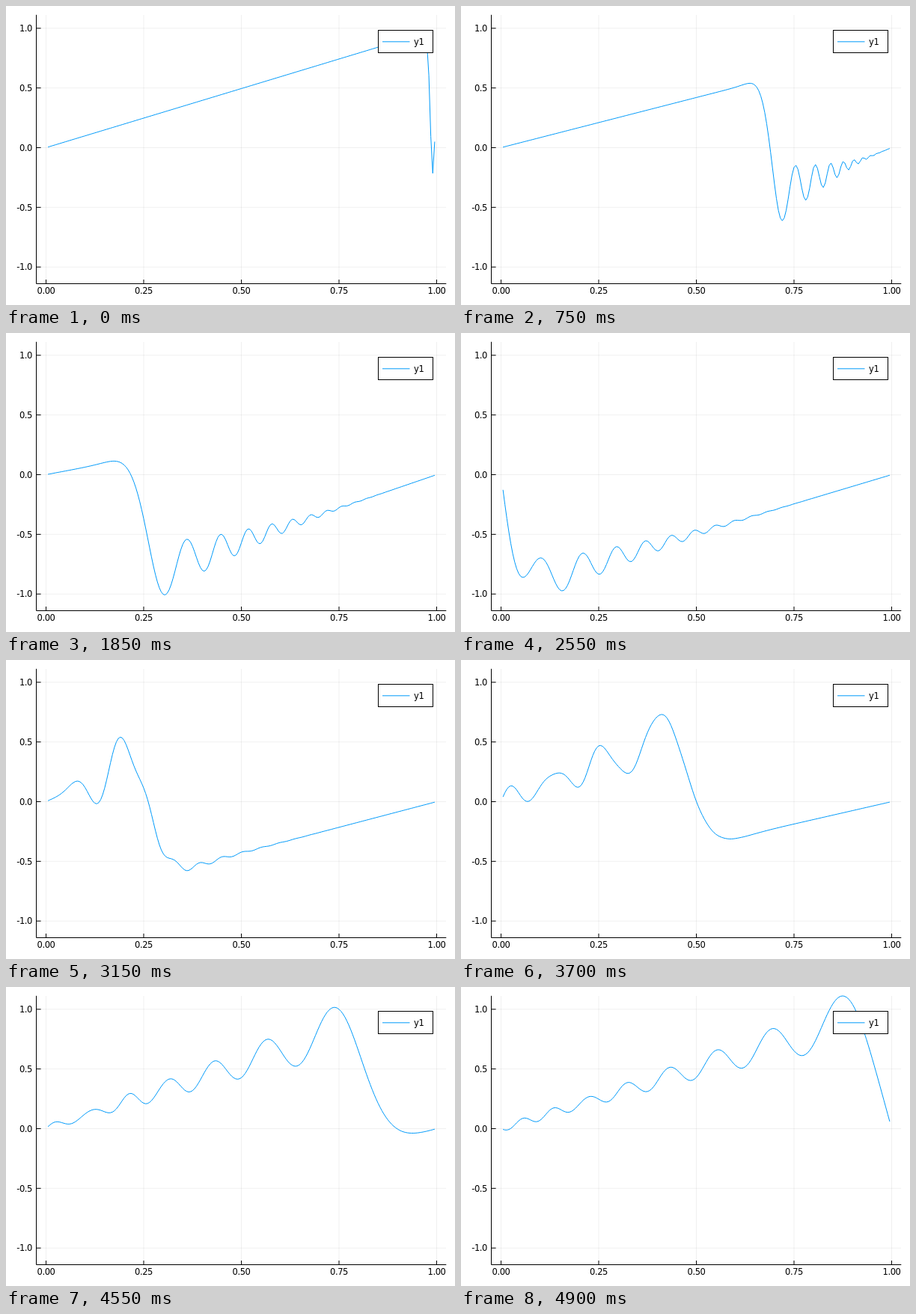
An HTML page for the animation above (4950 ms loop, 600 by 400 pixels).

```html
<!DOCTYPE html>
<html lang="en">
<head>
<meta charset="utf-8">
<title>Plucked string</title>
<style>
  html, body { margin: 0; width: 100%; height: 100%; overflow: hidden; background: #fff; }
  svg { display: block; width: 600px; height: 400px; }
  text { font: 11.5px "DejaVu Sans", sans-serif; letter-spacing: -.4px; fill: #000; }
  .grid { stroke: #000; stroke-opacity: .1; stroke-width: .6; }
  .axis { stroke: #000; stroke-width: 1; fill: none; }
  .wave { stroke: #009afa; stroke-width: 1; fill: none; stroke-linejoin: round; }
</style>
</head>
<body>
<svg viewBox="0 0 600 400">
  <g id="grid" class="grid"></g>
  <path id="axes" class="axis"></path>
  <g id="labels"></g>
  <path id="wave" class="wave"></path>
  <rect x="497.5" y="32.5" width="73" height="30" fill="#fff" stroke="#000"/>
  <path class="wave" d="M503 47.8H539.5"/>
  <text x="545" y="52">y1</text>
</svg>
<script>
const FRAMES = 99, FRAME_MS = 50, DT = 0.02;
const CELLS = 200, H = 1 / CELLS;
const px = x => 53.5 + 522 * x;
const py = y => 189.5 - 159.7 * y;
const el = id => document.getElementById(id);

function drawAxes() {
  let grid = '', labels = '', axes = 'M40.5 11.8V371.5H588.3';
  for (const v of [0, 0.25, 0.5, 0.75, 1]) {
    const x = px(v);
    grid += `<path d="M${x} 12V371"/>`;
    axes += `M${x} 371.5V366`;
    labels += `<text x="${x}" y="385" text-anchor="middle">${v.toFixed(2)}</text>`;
  }
  for (const v of [-1, -0.5, 0, 0.5, 1]) {
    const y = py(v);
    grid += `<path d="M41 ${y}H588"/>`;
    axes += `M40.5 ${y}H46.6`;
    labels += `<text x="35" y="${y + 4.2}" text-anchor="end">${v.toFixed(1)}</text>`;
  }
  el('grid').innerHTML = grid;
  el('labels').innerHTML = labels;
  el('axes').setAttribute('d', axes);
}

// String fixed at both ends: u(x,0) = x, u'(x,0) = -x/2, summed over its modes.
// A fourth-order implicit solver slows and damps the short waves; its step grows with time.
const stepAt = t => 0.0694 * Math.pow(t, 0.43);

const modes = Array.from({ length: CELLS - 1 }, (_, i) => {
  const k = i + 1, half = k * Math.PI * H / 2;
  const omega = 2 / H * Math.sin(half);
  const amp = (k % 2 ? 1 : -1) * H / Math.tan(half);
  return { k, omega, amp, phase: 0, gain: 0 };
});

// Stability function P(iz) / (1 - iz/4)^5, with P matching exp to fourth order.
function solverStep(z) {
  const z2 = z * z;
  const re = 1 + z2 / 8 + z2 * z2 * 7 / 768;
  const im = -z / 4 - z * z2 / 96;
  return {
    phase: Math.atan2(im, re) + 5 * Math.atan(z / 4),
    gain: Math.log(Math.hypot(re, im)) - 2.5 * Math.log1p(z2 / 16)
  };
}

function advance(m, t) {
  const step = stepAt(t), n = DT / step, { phase, gain } = solverStep(m.omega * step);
  m.phase += n * phase;
  m.gain += n * gain;
  return m.amp * Math.exp(m.gain) * (Math.cos(m.phase) - Math.sin(m.phase) / (2 * m.omega));
}

const sines = Array.from({ length: 2 * CELLS }, (_, i) => Math.sin(i * Math.PI * H));

function shape(frame) {
  const q = modes.map(m => advance(m, (frame + 0.5) * DT));
  let d = '';
  for (let i = 1; i < CELLS; i++) {
    let u = 0;
    modes.forEach((m, j) => { u += q[j] * sines[m.k * i % (2 * CELLS)]; });
    d += (i > 1 ? 'L' : 'M') + px(i * H).toFixed(2) + ' ' + py(u).toFixed(2);
  }
  return d;
}

drawAxes();
const shapes = Array.from({ length: FRAMES }, (_, f) => shape(f));
const start = performance.now();
let shown = -1;

function tick() {
  const f = Math.floor(Math.max(0, performance.now() - start) / FRAME_MS) % FRAMES;
  if (f !== shown) el('wave').setAttribute('d', shapes[shown = f]);
  requestAnimationFrame(tick);
}
tick();
</script>
</body>
</html>
```
